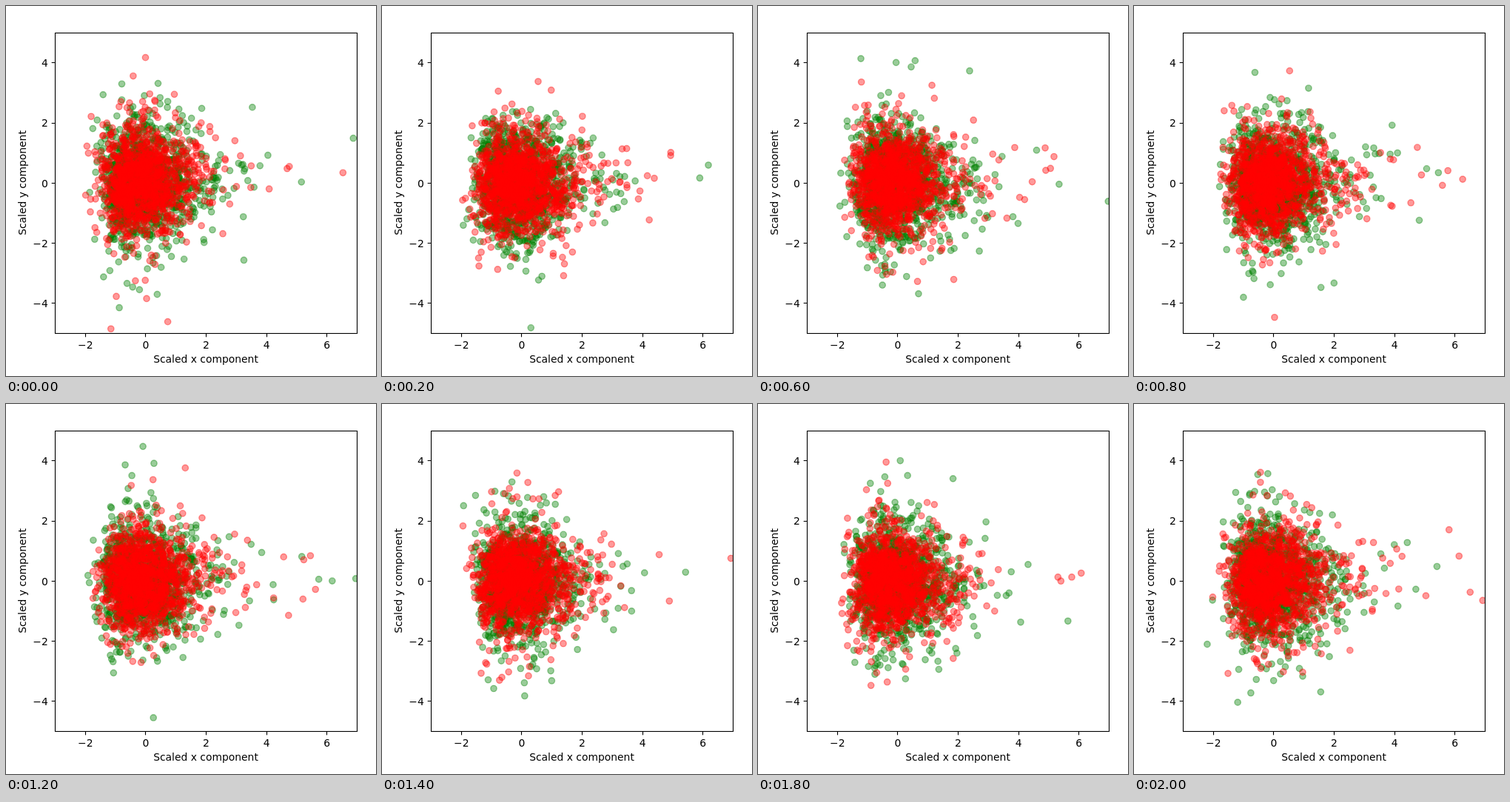
An HTML page with a canvas for the animation above (2200 ms loop, 500 by 500 pixels).

```html
<!DOCTYPE html>
<html lang="en">
<head>
<meta charset="utf-8">
<title>Scaled components</title>
<style>
  html, body { margin: 0; width: 100%; height: 100%; overflow: hidden; background: #fff; }
  canvas, svg { position: absolute; left: 0; top: 0; width: 500px; height: 500px; }
  text { font: 13.89px "DejaVu Sans", sans-serif; text-anchor: middle; }
  .right { text-anchor: end; }
  path, rect { fill: none; stroke: #000; stroke-width: 1.11; }
</style>
</head>
<body>
<canvas width="500" height="500"></canvas>
<svg viewBox="0 0 500 500">
  <rect x="66.5" y="36.5" width="408" height="406"/>
  <g id="ticks"></g>
  <text x="270" y="482">Scaled x component</text>
  <text transform="translate(27 239) rotate(-90)">Scaled y component</text>
</svg>
<script>
const STEP = 200, STEPS = 11, COUNT = 1200;
const GROUPS = [
  { color: "#008000", spread: 1.08 },
  { color: "#ff0000", spread: 1 }
];
const px = x => 188.9 + x * 40.8;
const py = y => 239.35 - y * 40.6;

function makeRandom(seed) {
  return () => {
    seed = (seed + 0x6d2b79f5) | 0;
    let t = Math.imul(seed ^ (seed >>> 15), 1 | seed);
    t = (t + Math.imul(t ^ (t >>> 7), 61 | t)) ^ t;
    return ((t ^ (t >>> 14)) >>> 0) / 4294967296;
  };
}

// Skewed in x with a thin tail to the right, symmetric in y.
function makeCloud(seed, spread) {
  const random = makeRandom(seed);
  const normal = () =>
    Math.sqrt(-2 * Math.log(1 - random())) * Math.cos(2 * Math.PI * random());
  return Array.from({ length: COUNT }, () => {
    let x = (Math.exp(0.3 * normal()) - 1.046) * 2.5 + 0.2 * normal() - 0.05;
    let y = spread * normal() * (random() < 0.8 ? 0.8 : 1.3);
    if (random() < 0.02) x += 1 - 1.4 * Math.log(1 - random());
    if (x > 2) y *= 0.85;
    return [px(x), py(y)];
  });
}

const clouds = Array.from({ length: STEPS }, (_, step) =>
  GROUPS.map(({ spread }, i) => makeCloud(1000 * (step + 1) + 77 * i, spread)));

const ctx = document.querySelector("canvas").getContext("2d");
ctx.beginPath();
ctx.rect(66.5, 36.5, 408, 406);
ctx.clip();
ctx.lineWidth = 1.39;
ctx.globalAlpha = 0.4;

function draw(step) {
  ctx.clearRect(0, 0, 500, 500);
  clouds[step].forEach((points, i) => {
    ctx.fillStyle = ctx.strokeStyle = GROUPS[i].color;
    for (const [x, y] of points) {
      ctx.beginPath();
      ctx.arc(x, y, 4.17, 0, 2 * Math.PI);
      ctx.fill();
      ctx.stroke();
    }
  });
}

const label = v => String(v).replace("-", "\u2212");
const snap = v => Math.floor(v) + 0.5;
let ticks = "";
for (let v = -2; v <= 6; v += 2) {
  ticks += `<path d="M${snap(px(v))} 442.5v4.86"/>` +
    `<text x="${px(v)}" y="463">${label(v)}</text>`;
}
for (let v = -4; v <= 4; v += 2) {
  ticks += `<path d="M66.5 ${snap(py(v))}h-4.86"/>` +
    `<text class="right" x="56.8" y="${Math.round(py(v) + 5.2)}">${label(v)}</text>`;
}
document.getElementById("ticks").innerHTML = ticks;

const start = performance.now();
let shown = -1;
function tick() {
  const step = Math.floor((performance.now() - start) / STEP) % STEPS;
  if (step !== shown) draw(shown = step);
  requestAnimationFrame(tick);
}
tick();
</script>
</body>
</html>
```
